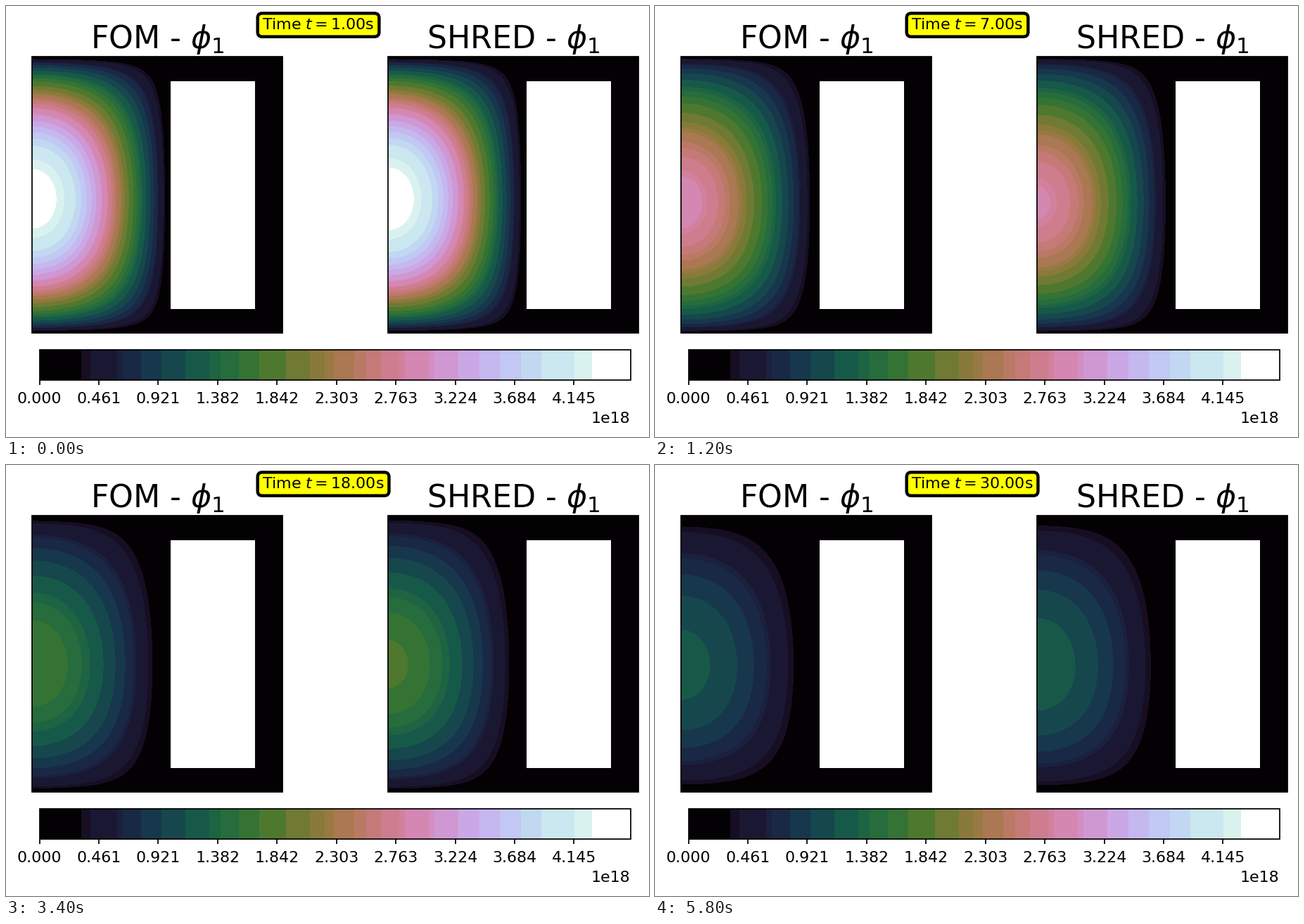
Animation, 914 px wide and 613 px high, one loop 6 s. Source, as a matplotlib script:

```python
import numpy as np
import matplotlib.pyplot as plt
from matplotlib.animation import FuncAnimation
from matplotlib.colors import ListedColormap
from matplotlib.patches import Rectangle

W, H = 914, 613
PT = 0.72                      # points per pixel at 100 dpi
STEPS, VMAX = 199, 4.5822
TOP, BOTTOM, WIDTH = 72, 465, 356
LINE = 1.75 * PT
TEXT = 22.15

plt.rcParams["font.family"] = "DejaVu Sans"


def banded_cubehelix():
    """Cubehelix steps merged where they share a coarse RGB cell."""
    raw = plt.get_cmap("cubehelix")((np.arange(STEPS) + 0.5) / STEPS)[:, :3]
    cells = (raw * 255).astype(int) // [32, 16, 32]
    cell = np.unique(cells, axis=0, return_inverse=True)[1].ravel()
    lut = np.array([raw[cell == c].mean(axis=0) for c in cell])
    lut[cell == cell[0]] = raw[2]
    lut[cell == cell[-1]] = 1
    return ListedColormap(lut)


cmap = banded_cubehelix()

# Peak flux in level steps; its inverse grows almost linearly
KEYS = [1, 7, 11, 30]
PEAKS = {"FOM": [194, 127, 96.7, 52], "SHRED": [195, 124.5, 99, 54.5]}

y = np.arange(TOP, BOTTOM) + 0.5
sine = np.sin(np.pi * (y - TOP) / (BOTTOM - TOP))
r = np.minimum(np.arange(WIDTH) + 0.5, 200)
radial = np.cos(np.minimum(0.0083 * r * (1 - (r / 410) ** 4), np.pi / 2))


def axial(t):
    """Flattened sine that tilts slowly towards the bottom."""
    tilt = 0.03 + 0.08 * (1 - np.exp(-t / 10))
    g = sine * np.exp(tilt * (y - TOP) / 100)
    g /= g.max()
    edge = 0.2 * (1 - np.exp(-(t - 1) / 4))
    return g ** (0.72 - edge * (1 - g) ** 3)


def flux(name, t):
    peak = 1 / np.interp(t, KEYS, 1 / np.array(PEAKS[name]))
    return peak * np.outer(axial(t), radial)


fig = plt.figure(figsize=(W / 100, H / 100), dpi=100, facecolor="white")
ax = fig.add_axes([0, 0, 1, 1])
ax.axis("off")


def label(x, base, text, px=TEXT, ha="center", **kw):
    return ax.text(x, base, text, fontsize=px * PT, ha=ha, va="baseline", **kw)


def frame(x, top, w, h):
    ax.add_patch(Rectangle((x, top), w, h, fill=False, ec="black", lw=LINE,
                           zorder=4))


def bands(data, x, top, w, h):
    return ax.imshow(data, cmap=cmap, vmin=0, vmax=STEPS,
                     interpolation="nearest", aspect="auto",
                     extent=(x, x + w, top + h, top))


def panel(name, x):
    img = bands(flux(name, 1), x, TOP, WIDTH, BOTTOM - TOP)
    ax.add_patch(Rectangle((x + 197, 107), 119.5, 324, fc="white", lw=0,
                           zorder=3))
    frame(x, TOP, WIDTH, BOTTOM - TOP)
    label(x + 178.5, 60, rf"{name} - $\phi_1$", 2 * TEXT)
    return img


images = {"FOM": panel("FOM", 37), "SHRED": panel("SHRED", 543)}

# Colour bar
BX, BY, BW, BH = 47.6, 489.4, 840, 42.2
bands(np.arange(STEPS)[None, :] + 0.5, BX, BY, BW, BH)
frame(BX, BY, BW, BH)
for level in range(0, STEPS, 20):
    x = BX + BW * level / STEPS
    ax.plot([x, x], [BY + BH, BY + BH + 7.8], color="black", lw=LINE,
            solid_capstyle="butt")
    label(x, 565, f"{VMAX * level / STEPS:.3f}")
label(BX + BW, 593, "1e18", ha="right")

clock = label(364.3, 33, "", ha="left", zorder=5,
              bbox=dict(boxstyle="round,pad=0.3", fc="yellow", ec="black",
                        lw=4.4 * PT))

ax.set_xlim(0, W)
ax.set_ylim(H, 0)


def update(i):
    t = i + 1
    for name, img in images.items():
        img.set_data(flux(name, t))
    clock.set_text(rf"Time $t = {t:.2f}$s")
    return [*images.values(), clock]


anim = FuncAnimation(fig, update, frames=30, interval=200, repeat=True,
                     repeat_delay=0, blit=False)
plt.show()
```
